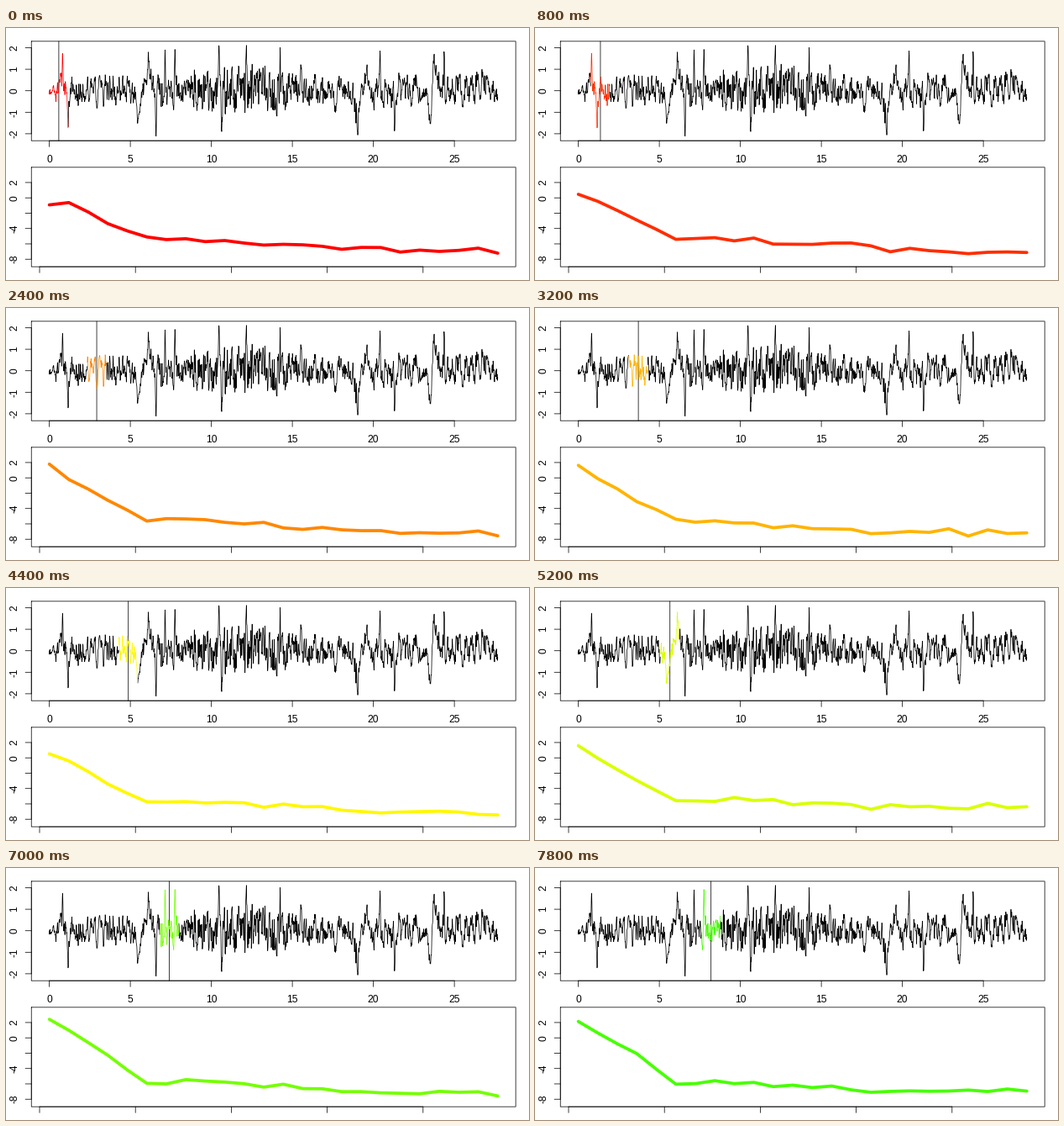
A matplotlib script that plays this animation: 623 px wide and 300 px high, repeating every 8 s.

```python
import numpy as np
import matplotlib.pyplot as plt
from matplotlib.animation import FuncAnimation
from matplotlib.colors import hsv_to_rgb

W, H, DPI = 623, 300, 100
PX = 72 / DPI                      # one pixel in points
FRAMES, INTERVAL = 40, 200
SAMPLES, WINDOW, STEP = 2272, 96, 16
WINDOWS = (SAMPLES - WINDOW) // STEP
LEFT, RIGHT = 30.24, 607.16
TOP = (15.84, 134.16)
BOTTOM = (165.84, 284.16)
X0, X1 = 51.6, 585.8               # data range inside both boxes
TICK, THIN, THICK = 7.2, .75, 3.75

plt.rcParams["font.family"] = "Liberation Sans"
plt.rcParams["path.simplify"] = False

# Slow swings of the signal: (x, height, width)
SWINGS = [(159, -.8, 3), (170, .6, 3), (419, -1.6, 2.5), (428, .6, 4),
          (504, -.9, 3), (514, .6, 7), (583, -.8, 3)]
# Tallest peaks: (x, value)
PEAKS = [(67.5, 1.75), (73.8, -1.5), (170, 1.45), (178.8, -2.15),
         (189.5, 1.9), (201, 1.6), (253.7, 2.13), (257, -1.9), (286.3, 2.1),
         (326.5, 1.9), (419, -2.05), (445.5, 1.8), (463, -1.85), (510, 1.7),
         (522, 1.8)]

# Key heights of the spectrum line at a few frequency bins
BINS = [0, 1, 3, 5, 9, 23]
POSES = {0: [211, 207, 232, 249, 252, 265],
         8: [183, 206, 226, 253, 249, 267],
         16: [188, 202, 229, 251, 256, 267],
         22: [197, 205, 232, 253, 255, 266],
         26: [188, 202, 228, 253, 251, 260],
         31: [179, 191, 224, 255, 252, 270],
         39: [183, 196, 221, 257, 256, 265]}


def bell(x, center, width):
    return np.exp(-((x - center) / width) ** 2)


def smooth_noise(rng, n, sigma):
    kernel = bell(np.arange(-12, 13), 0, sigma * 2 ** .5)
    noise = np.convolve(rng.normal(size=n), kernel, "same")
    return noise / noise.std()


def make_signal(x):
    rng = np.random.default_rng(12)
    busy = bell(x, 285, 65)
    spread = .42 + .25 * busy - .2 * bell(x, 54, 9)
    share = .62 + .28 * busy
    slow = smooth_noise(rng, x.size, 3.6)
    fast = smooth_noise(rng, x.size, .9)
    y = spread * (np.sqrt(1 - share ** 2) * slow + share * fast)
    y = 1.6 * np.tanh(y / 1.6)
    y += sum(h * bell(x, c, w) for c, h, w in SWINGS)
    for c, value in PEAKS:
        y += (value - np.interp(c, x, y)) * bell(x, c, .7)
    return np.clip(y, -2.15, 2.13)


def make_spectra(bins):
    rng = np.random.default_rng(5)
    times = list(POSES)
    keys = np.array([np.interp(range(FRAMES), times, col)
                     for col in zip(*POSES.values())]).T
    tail = np.clip((bins - 9) / 14, 0, 1)
    sag = 4 * np.sin(np.pi * tail)
    ripple = np.array([smooth_noise(rng, FRAMES, 1.5) for _ in bins]).T
    ripple *= np.where(bins > 5, 1.8, .6)
    return np.array([np.interp(bins, BINS, row) for row in keys]) + sag + ripple + .5


fig = plt.figure(figsize=(W / 100, H / 100), dpi=DPI, facecolor="white")
ax = fig.add_axes([0, 0, 1, 1])
ax.set(xlim=(0, W), ylim=(H, 0))
ax.axis("off")


def line(x, y, width=THIN, z=2):
    return ax.plot(x, y, color="black", lw=width * PX, zorder=z, snap=False,
                   solid_joinstyle="round", solid_capstyle="round")[0]


def box(y0, y1):
    line([LEFT, RIGHT, RIGHT, LEFT, LEFT], [y0, y0, y1, y1, y0])


def x_axis(xs, y, labels=()):
    line([xs[0], xs[-1]], [y, y])
    for x in xs:
        line([x, x], [y, y + TICK])
    for x, label in zip(xs, labels):
        ax.text(x, y + 25.8, label, size=12 * PX, ha="center", va="baseline")


def y_axis(ys, labels):
    line([LEFT, LEFT], [ys[0], ys[-1]])
    for y, label in zip(ys, labels):
        line([LEFT - TICK, LEFT], [y, y])
        ax.text(13.2, y, label, size=12 * PX, rotation=90, ha="center",
                va="baseline", rotation_mode="anchor")


def signal_y(v):
    return 74.7 - 25.6 * v


box(*TOP)
box(*BOTTOM)
seconds, levels = np.arange(0, 30, 5), np.arange(-2, 3)
x_axis(X0 + 19.3 * seconds, TOP[1], seconds)
y_axis(signal_y(levels), levels)
powers = np.arange(-8, 3, 2)
x_axis(40 + 114.2 * np.arange(5), BOTTOM[1])
y_axis(202.2 - 9.13 * powers, ["-8", "", "-4", "", "0", "2"])

xs = np.linspace(X0, X1, SAMPLES)
ys = signal_y(make_signal(xs))
bins = np.arange(24)
spectra = make_spectra(bins)

rest = line(xs, ys)
cursor = line([], [], z=3)
part = line([], [], z=4)
curve = line(np.linspace(X0, X1, bins.size), spectra[0], THICK, z=3)


def draw(i):
    color = hsv_to_rgb((i / WINDOWS, 1, 1))
    start = STEP * i
    end = start + WINDOW
    outside = ys.copy()
    outside[start:end] = np.nan
    rest.set_ydata(outside)
    cursor.set_data([xs[start + WINDOW // 2]] * 2, TOP)
    part.set_data(xs[start:end], ys[start:end])
    curve.set_ydata(spectra[i])
    for item in (part, curve):
        item.set_color(color)
    return rest, cursor, part, curve


anim = FuncAnimation(fig, draw, frames=FRAMES, interval=INTERVAL,
                     repeat=True, repeat_delay=0)
plt.show()
```
